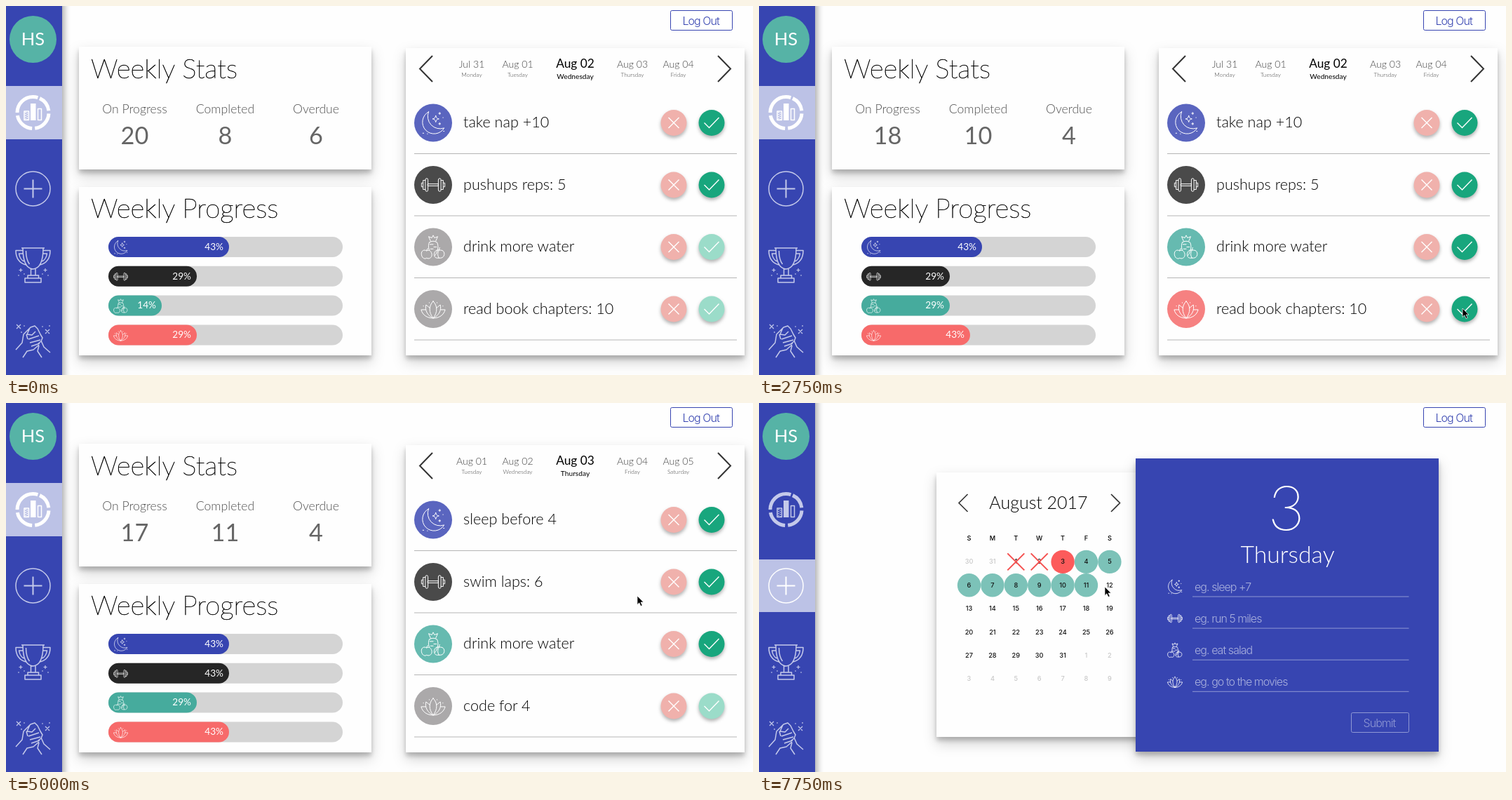
These frames come from a looping animation (1065x526 px, 8 s). An HTML page:

```html
<!DOCTYPE html>
<html lang="en">
<head>
<meta charset="utf-8">
<title>Weekly planner</title>
<style>
html, body { margin: 0; width: 100%; height: 100%; overflow: hidden; background: #fefefe; }
svg { display: block; }
#stage { width: 100vw; height: 100vh; font-family: Lato, sans-serif; font-weight: 300; }
.card { fill: #fefefe; filter: drop-shadow(0 5px 3px rgba(0,0,0,.2)) drop-shadow(0 8px 9px rgba(0,0,0,.19)); }
.blue { fill: #3745b1; }
.side { filter: drop-shadow(3px 0 5px rgba(0,0,0,.35)); }
.mid { text-anchor: middle; }
.end { text-anchor: end; }
.thin { font-weight: 200; stroke: #000; stroke-width: .55; }
.h1 { font-size: 38.4px; }
.label { font-size: 17.6px; fill: #505050; }
.count { font-size: 34.3px; font-weight: 400; fill: #666; }
.task { font-size: 21.6px; }
.pct { font-size: 13.6px; font-weight: 400; fill: #fff; }
.ui { font: 300 16px Inter, sans-serif; letter-spacing: -.95px; }
.day { font: 500 9.2px Inter, sans-serif; text-anchor: middle; }
.line, .icon { fill: none; stroke-linecap: round; stroke-linejoin: round; }
.line { stroke: #333; stroke-width: 2; stroke-linecap: butt; stroke-linejoin: miter; }
.icon { stroke: #fff; }
.button { filter: drop-shadow(0 3px 2.5px rgba(0,0,0,.3)); }
.glyph { fill: none; stroke: #fff; stroke-width: 1.4; }
.nav { color: #c4c9ea; fill: none; stroke: currentColor; stroke-width: 1.5; stroke-linejoin: round; }
.nav .solid { fill: currentColor; stroke: none; }
.nav.on { color: #fff; }
symbol path { vector-effect: non-scaling-stroke; }
</style>
</head>
<body>
<svg id="stage" viewBox="0 0 1065 526">
  <defs>
    <symbol id="moon" viewBox="0 0 40 40">
      <path d="M13 3A18 18 0 1 0 37 28A19 19 0 0 1 13 3ZM24 9q1 5 5 5-4 0-5 5-1-5-5-5 4 0 5-5M30 4v3M28.500 5.500h3M30 20v3M28.500 21.500h3M4 36h1.500M11 37h.5M36 33h1M35 12h.5"/>
    </symbol>
    <symbol id="weights" viewBox="0 0 40 40">
      <path d="M12 18.500H28V21.500H12ZM8 12q0-2 2-2t2 2V28q0 2-2 2t-2-2ZM28 12q0-2 2-2t2 2V28q0 2-2 2t-2-2ZM8 13H4.500V27H8M32 13h3.500V27H32M4.500 17H2v6h2.500M35.500 17H38v6h-2.500"/>
    </symbol>
    <symbol id="food" viewBox="0 0 40 40">
      <path d="M14 13q6-4 12 0c3 6 1 14-3 20M14 13c-2 4-1 9 0 12M16 11 13 4l5 2 2-4 2 4 5-2-3 7M15 16h5M21 20h4M16 23h4M10 26c-4-3-9 0-8 6s6 7 8 5c3 2 8 0 8-5s-5-9-8-6q0-3 2-4M26 25c-6 1-6 12 0 12h5c8 0 8-12 1-12q-3-1-6 0M29 25q-4 6 0 12M29 25l1-4"/>
    </symbol>
    <symbol id="lotus" viewBox="0 0 40 40">
      <path d="M20 8C13 15 13 25 20 34C27 25 27 15 20 8ZM14.500 18 9 13.500C7 22 11 30 20 34M25.500 18l5.500-4.500C33 22 29 30 20 34M8.500 21H1.500c2 8 9 13 18.500 13 9.500 0 16.500-5 18.500-13h-7M14 10v.5M26 10v.5M5 15v.5M35 15v.5"/>
    </symbol>
  </defs>

  <g id="dashboard">
    <rect class="card" x="104" y="58" width="417" height="175"/>
    <rect class="card" x="104" y="258" width="417" height="240"/>
    <rect class="card" x="570" y="60" width="483" height="438"/>
    <text class="h1 thin" x="121" y="102.500">Weekly Stats</text>
    <text class="h1 thin" x="121" y="301.500">Weekly Progress</text>
    <g id="stats"></g>
    <g id="bars"></g>
    <path class="line" d="M608 71L590 89.500 608 108M1015 71l18 18.500L1015 108"/>
    <g id="dates"></g>
    <g id="tasks"></g>
  </g>

  <g id="planner">
    <g id="calendar"></g>
    <rect class="card" style="fill:#3745b1" x="537" y="79" width="432" height="418"/>
    <g id="form" fill="#fff">
      <text class="mid thin" style="stroke:#fff;stroke-width:1.200" x="752" y="181" font-size="88">3</text>
      <text class="mid" x="753.500" y="227.500" font-size="33.800">Thursday</text>
    </g>
  </g>

  <rect x="947.500" y="6.500" width="88" height="28" rx="2" fill="#fff" stroke="#3745b1"/>
  <text class="ui blue" x="964.500" y="27">Log Out</text>

  <g>
    <rect class="blue side" x="-9" y="-9" width="89" height="544"/>
    <rect id="statsTab" y="114" width="80" height="76" fill="#bcc2e6"/>
    <rect id="plusTab" y="223" width="80" height="75" fill="#bcc2e6"/>
    <circle cx="38.500" cy="47.500" r="33.500" fill="#56b3a6"/>
    <text class="mid" x="38.500" y="56" font-size="25.500" font-weight="400" fill="#fff">HS</text>
    <g id="statsNav" class="nav">
      <circle cx="38.500" cy="152" r="22.500" stroke-width="5" pathLength="100" stroke-dasharray="22 3 21 3 30 2 16 3" stroke-dashoffset="-1"/>
      <path class="solid" d="M35 139h7.500v24H35z"/>
      <path d="M26 150h6.500v12.500H26zM45.500 146.500h5v16h-5z"/>
      <path stroke-dasharray="1.500 1.500" d="M28 151v11M30.500 152v10"/>
    </g>
    <g id="plusNav" class="nav">
      <circle cx="38.500" cy="260.500" r="24.500"/>
      <path d="M25.500 260.500h26M38.500 247.500v26" stroke-width="2"/>
    </g>
    <g class="nav">
      <path d="M22 345H55M24 345c0 18 4 29 14.500 30c10.500-1 14.500-12 14.500-30M24 348.500H14c0 11 5 18 14.500 20.500M53 348.500h10c0 11-5 18-14.500 20.500M25 353h-6.500c1 6 3 9 7 11M52 353h6.500c-1 6-3 9-7 11M28.500 349c0 9 2 15 5 19M35.500 375v9h6.500v-9M31 384h15.500v4H31zM27 388h23v6H27z"/>
      <path d="M21 374v5M18.500 376.500h5M56 374v5M53.500 376.500h5M17 384h2M25 382h2M51 382h2M59 384h2" stroke-width="1.200"/>
    </g>
    <g class="nav">
      <path d="M14 490l9-10 2-12 10-10 6-2 4 4 4 8 3 5-2 5-5 4M24 501l6-9 9-2 8-7M34 459l-4 9 7 1 5-5M29 468l2 7M32 475l15-5M34 480l15-4M36 485l12-4M50 477l4 9 9 8M47 484l-2 8 6 9"/>
      <path d="M15 454l6 6M21 454l-6 6M56 461l6 6M62 461l-6 6M25 456h2M22 464v2M51 457h2M62 455v2" stroke-width="1.200"/>
    </g>
  </g>
  <path id="cursor" d="M0 0V12.500L2.800 9.800 5 14.500 7.200 13.500 5 9H9Z" stroke="#fff" stroke-width=".7"/>
</svg>

<script>
const STEP = 250, LOOP = 8000;
const $ = id => document.getElementById(id);
const range = (n, fn) => Array.from({ length: n }, (_, i) => fn(i)).join('');

const icons = ['moon', 'weights', 'food', 'lotus'];
const barColors = ['#3745b1', '#262626', '#46ab9d', '#f76a6a'];
const doneColors = ['#5a65bf', '#4a4a4a', '#66bab0', '#f68181'];
const days = [['Jul 31', 'Monday'], ['Aug 01', 'Tuesday'], ['Aug 02', 'Wednesday'],
  ['Aug 03', 'Thursday'], ['Aug 04', 'Friday'], ['Aug 05', 'Saturday']];
const dateX = [664, 729.5, 811.5, 893, 958.5];
const taskSets = [
  ['take nap +10', 'pushups reps: 5', 'drink more water', 'read book chapters: 10'],
  ['sleep before 4', 'swim laps: 6', 'drink more water', 'code for 4']];
const hints = ['eg. sleep +7', 'eg. run 5 miles', 'eg. eat salad', 'eg. go to the movies'];

// Steps at which each click lands.
const WATER = 8, BOOK = 11, NEXT_DAY = 14, SWIM = 18, HOVER_PLUS = 23, PLANNER = 27;
const hoverRow = k => k >= 5 && k < WATER ? 2 : k === 10 ? 3 : k === 17 ? 1 : -1;

// Cursor way points: step, x, y.
const path = [[2, 874, 479], [3, 930, 425], [4, 985, 358], [5, 1002, 342], [8, 1002, 342],
  [9, 1003, 370], [10, 1003, 425], [11, 1003, 431], [12, 1053, 130], [13, 1024, 88],
  [14, 1024, 88], [15, 1022, 100], [16, 1012, 190], [17, 1005, 257], [19, 1004, 258],
  [20, 900, 275], [21, 570, 302], [22, 250, 302], [23, 70, 262], [24, 57, 254],
  [26, 57, 254], [27, 83, 248], [28, 150, 238], [29, 270, 238], [30, 400, 252], [31, 493, 262]];

function cursorAt(k) {
  const i = path.findIndex(p => p[0] >= k);
  const [k1, x1, y1] = path[i];
  if (k1 === k) return [x1, y1];
  const [k0, x0, y0] = path[i - 1], f = (k - k0) / (k1 - k0);
  return [x0 + (x1 - x0) * f, y0 + (y1 - y0) * f];
}

const icon = (name, cx, cy, size, weight) =>
  `<use href="#${name}" class="icon" stroke-width="${weight}" x="${cx - size / 2}" y="${cy - size / 2}" width="${size}" height="${size}"/>`;

function drawStats(k) {
  const counts = k < WATER ? [20, 8, 6] : k < BOOK ? [19, 9, 5] : k < SWIM ? [18, 10, 4] : [17, 11, 4];
  return ['On Progress', 'Completed', 'Overdue'].map((name, i) => {
    const x = [183.5, 312.5, 442][i];
    return `<text class="label mid" x="${x}" y="153">${name}</text>
      <text class="count mid" x="${x}" y="196.5">${counts[i]}</text>`;
  }).join('');
}

function drawBars(k) {
  const edge = { 14: 222, 29: 272, 43: 318 };
  const grow = (from, to, start) => {
    if (k < start) return [from, edge[from]];
    const f = [.63, .96][k - start] ?? 1;
    return [to, edge[from] + (edge[to] - edge[from]) * f];
  };
  const bars = [[43, 318], grow(29, 43, SWIM), grow(14, 29, WATER), grow(29, 43, BOOK)];
  return bars.map(([percent, right], i) => {
    const y = 329 + i * 41.8;
    return `<rect x="146" y="${y}" width="334" height="29" rx="14.5" fill="#d4d4d4"/>
      <rect x="146" y="${y}" width="${right - 146}" height="29" rx="14.5" fill="${barColors[i]}"/>
      ${icon(icons[i], 163.5, y + 15, 22, .65)}
      <text class="pct end" x="${right - 8}" y="${y + 18.7}">${percent}%</text>`;
  }).join('');
}

function drawDates(day) {
  return dateX.map((x, i) => {
    const [date, name] = days[i + day], main = i === 2;
    return `<g class="mid" ${main ? 'font-weight="400"' : 'fill="#444"'}>
      <text x="${x}" y="88" font-size="${main ? 17.3 : 14.1}">${date}</text>
      <text x="${x}" y="${main ? 103.5 : 101}" font-size="${main ? 10.2 : 8.3}">${name}</text></g>`;
  }).join('');
}

function drawTasks(k, day) {
  const done = day ? [true, k >= SWIM, true, false] : [true, true, k >= WATER, k >= BOOK];
  return taskSets[day].map((name, i) => {
    const y = 166.5 + i * 88.5;
    const check = done[i] ? '#18a67d' : hoverRow(k) === i ? '#6fc9b0' : '#9bdcc9';
    return `<circle cx="609" cy="${y}" r="27" fill="${done[i] ? doneColors[i] : '#aba9aa'}"/>
      ${icon(icons[i], 609, y, 37, 1)}
      <text class="task" x="652" y="${y + 6.5}">${name}</text>
      <circle class="button" cx="952" cy="${y}" r="18.5" fill="#f0b1ac"/>
      <circle class="button" cx="1006" cy="${y}" r="18.5" fill="${check}"/>
      <path class="glyph" d="M944.5 ${y - 7.5}l15 15m0-15l-15 15M995.5 ${y}l7 7L1016.5 ${y - 7.5}"/>
      <path d="M582 ${y + 44}H1042" stroke="#b5b5b5"/>`;
  }).join('');
}

function drawCalendar() {
  const cell = i => {
    const x = 299.5 + i % 7 * 33.4, y = 226.4 + Math.floor(i / 7) * 33.4;
    const n = i - 1, inMonth = n >= 1 && n <= 31;
    const label = n < 1 ? n + 31 : inMonth ? n : n - 31;
    const disc = n >= 3 && n <= 11 ? `<circle cx="${x}" cy="${y}" r="16.7" fill="${n === 3 ? '#fc5b5b' : '#7cc2b8'}"/>` : '';
    const cross = n === 1 || n === 2 ? `<path d="M${x - 12} ${y - 12}l24 24m0-24l-24 24" stroke="#f4504f" stroke-width="2"/>` : '';
    return `${disc}<text class="day" x="${x}" y="${y + 3}" fill="${inMonth ? '#111' : '#c8c8c8'}">${label}</text>${cross}`;
  };
  return `<rect class="card" x="253" y="99" width="310" height="377"/>
    <path class="line" style="stroke-width:1.6" d="M297.500 130L285 142.500l12.500 12.500M502 130l12.500 12.500L502 155"/>
    <text class="mid" x="398.500" y="150.500" font-size="25">August 2017</text>
    ${range(7, i => `<text class="day" x="${299.5 + i * 33.4}" y="196">${'SMTWTFS'[i]}</text>`)}
    ${range(42, cell)}`;
}

function drawForm() {
  return hints.map((hint, i) => {
    const y = 262 + i * 45.1;
    return `${icon(icons[i], 593, y, 23, .8)}
      <text class="ui" x="621" y="${y + 6}" fill="#a9b0dd">${hint}</text>
      <path d="M618 ${y + 14}H926.5" stroke="#8f98d4"/>`;
  }).join('') + `<rect x="844.5" y="441.5" width="82" height="28" rx="2" fill="none" stroke="#8f98d4"/>
    <text class="ui" x="861.5" y="461.5" fill="#8f98d4">Submit</text>`;
}

function render(k) {
  const planner = k >= PLANNER, day = k >= NEXT_DAY ? 1 : 0;
  $('dashboard').style.display = planner ? 'none' : '';
  $('planner').style.display = planner ? '' : 'none';
  $('stats').innerHTML = drawStats(k);
  $('bars').innerHTML = drawBars(k);
  $('dates').innerHTML = drawDates(day);
  $('tasks').innerHTML = drawTasks(k, day);
  $('calendar').setAttribute('transform', `translate(${k === PLANNER ? 104 : 0})`);
  $('statsTab').style.opacity = planner ? 0 : 1;
  $('plusTab').style.opacity = k < HOVER_PLUS ? 0 : k === HOVER_PLUS ? .6 : 1;
  $('statsNav').classList.toggle('on', !planner);
  $('plusNav').classList.toggle('on', k >= HOVER_PLUS);
  $('cursor').style.display = k < path[0][0] ? 'none' : '';
  $('cursor').setAttribute('transform', `translate(${cursorAt(Math.max(k, path[0][0]))})`);
}

$('calendar').innerHTML = drawCalendar();
$('form').insertAdjacentHTML('beforeend', drawForm());

const start = performance.now();
let shown = -1;
function tick() {
  const k = Math.floor((performance.now() - start) % LOOP / STEP);
  if (k !== shown) render(shown = k);
  requestAnimationFrame(tick);
}
tick();
</script>
</body>
</html>
```
